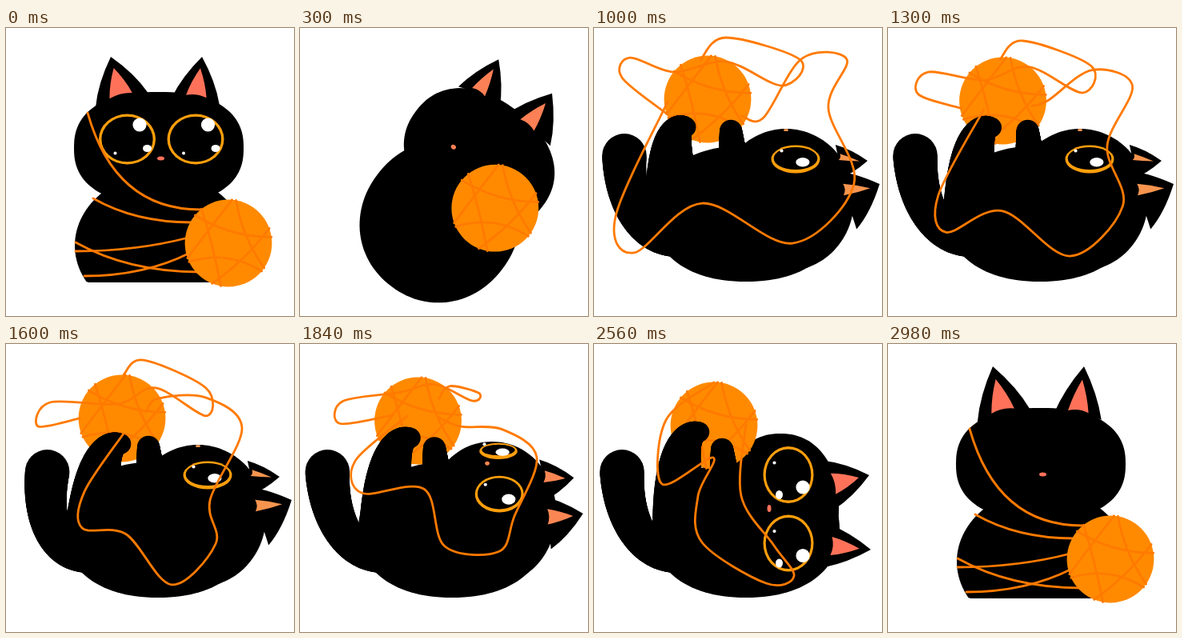
Recreate the animation shown at these times as an HTML page with a canvas. Size 360 by 360 pixels, loop 3 s.

```html
<!DOCTYPE html>
<html lang="en">
<head>
<meta charset="utf-8">
<title>Cat and yarn</title>
<style>
html, body { margin: 0; width: 100%; height: 100%; overflow: hidden; background: #fff; }
canvas { display: block; width: 360px; height: 360px; }
</style>
</head>
<body>
<canvas id="stage"></canvas>
<script>
const canvas = document.getElementById('stage');
const ctx = canvas.getContext('2d');
const dpr = window.devicePixelRatio || 1;
canvas.width = canvas.height = 360 * dpr;

const LOOP = 3000, PIVOT = [185, 197], R = 54.4;
const YARN = '#ff7a00', BALL = '#ff8a00', RING = '#ff9f0c';
const TURN = Math.PI / 2, TAU = Math.PI * 2;

const clamp = v => Math.max(0, Math.min(1, v));
const smooth = k => k * k * (3 - 2 * k);
const linear = k => k;
const ramp = (t, a, b) => smooth(clamp((t - a) / (b - a)));
const mix = (a, b, k) => Array.isArray(a) ? a.map((v, i) => mix(v, b[i], k)) : a + (b - a) * k;

// Value of a keyed track: [time, value], ...
function track(t, keys, ease = smooth) {
  const i = keys.findIndex(key => t <= key[0]);
  if (i < 0) return keys[keys.length - 1][1];
  if (i === 0) return keys[0][1];
  const [t0, a] = keys[i - 1], [t1, b] = keys[i];
  return mix(a, b, ease((t - t0) / (t1 - t0)));
}

// All poses are in the lying frame; the whole cat is turned to sit.
// head, body: x, y, rx, ry, power, left cut; ears: base, tip, half width;
// eyes: x, y, half width, half height; nose: x, y, rx, ry
const body = [190, 232, 117, 85, 2.2, 0];
const front = {
  head: [233, 206, 73, 94, 2.2, 0], body,
  ears: [[294, 176, 344, 164, 31], [291, 252, 346, 257, 27]],
  eyes: [[243, 163.5, 35.5, 31.5], [243, 249, 35.5, 31.5]],
  nose: [219, 205.5, 2.5, 4.5], side: 0, glint: 1
};
const turned = {
  head: [240, 206, 73, 90, 2.1, 0], body,
  ears: [[299, 175, 343, 169, 33], [297, 235, 349, 238, 26]],
  eyes: [[245, 152, 25.5, 29.5], [245, 223.5, 31, 30.5]],
  nose: [225, 182, 2.5, 4], side: 0, glint: 0
};
const profile = {
  head: [240, 215, 85, 89, 2, 0], body,
  ears: [[303, 168, 342, 166, 22], [312, 215, 357, 195, 40]],
  eyes: [[250, 122, 0, 20], [252, 164, 17.5, 30.5]],
  nose: [240, 127.5, 3, 1.5], side: 1, glint: 0
};
const sitting = lift => ({
  ...front,
  head: [232, 203, 70, 106, 2.4, 0],
  body: [110, 205, 90, 107, 2, 64],
  ears: [[292, 157, 346 + lift, 143, 34], [291, 249, 346 + lift, 257, 30]]
});

// Hind leg as base, bend, end; then the end of the other paw
const legKeys = [
  [1000, [100, 225, 88, 118, 116, 124, 171, 128]],
  [1600, [110, 230, 112, 120, 145, 125, 178, 128]],
  [2080, [110, 225, 100, 110, 134, 110, 158, 131]],
  [2560, [109, 225, 98, 110, 133, 110, 160, 131]]
];
const ballKeys = [
  [160, [278, 269]], [540, [168, 128]], [1000, [142, 89]], [1600, [145, 93]],
  [2080, [150, 99]], [2560, [150, 102]], [2840, [278, 269]]
];
const swayKeys = [[700, 12], [1000, 3], [1300, -1], [1600, 17], [1860, -1], [2080, 2], [2560, 0]];
const longYarn = [
  [1000, [185,110, 212,112, 260,38, 316,39, 293,100, 325,195, 248,269, 135,219, 50,281, 27,235, 92,92]],
  [1600, [175,85, 190,68, 250,67, 295,105, 255,195, 262,250, 207,301, 150,238, 95,230, 98,185, 147,112]],
  [2080, [170,98, 212,138, 255,146, 297,178, 281,235, 235,269, 155,205, 160,125, 60,143, 40,108, 122,68]],
  [2560, [190,100, 184,190, 225,252, 250,290, 215,299, 135,248, 130,190, 149,142, 85,175, 90,95, 150,48]]
];
const shortYarn = [
  [1000, [92,108, 35,62, 45,37, 100,55, 165,42, 235,72, 258,40, 165,12, 133,40]],
  [1600, [92,93, 40,103, 55,73, 140,75, 187,55, 250,90, 250,55, 172,20, 147,38]],
  [2080, [140,85, 60,96, 52,70, 110,46, 150,46, 180,52, 198,68, 203,85, 200,98]]
];
// Ends of the strands wound round the sitting cat
const wraps = [[102,106, 243,227], [109,213, 232,243], [87,268, 242,305], [87,279, 228,262], [98,310, 230,281]];

function oval(x, y, rx, ry, fill) {
  ctx.beginPath();
  ctx.ellipse(x, y, Math.max(0, rx), Math.max(0, ry), 0, 0, TAU);
  ctx.fillStyle = fill;
  ctx.fill();
}

function bulb([x, y, rx, ry, power, cut]) {
  const bend = v => Math.sign(v) * Math.abs(v) ** (2 / power);
  ctx.beginPath();
  for (let a = 0; a < TAU; a += TAU / 120) {
    ctx.lineTo(Math.max(cut, x + rx * bend(Math.cos(a))), y + ry * bend(Math.sin(a)));
  }
  ctx.fillStyle = '#000';
  ctx.fill();
}

// Round limb along a cubic, its radius running from r0 to r1
function limb([ax, ay], [bx, by], [cx, cy], [dx, dy], r0, r1) {
  for (let k = 0; k <= 1; k += 1 / 60) {
    const j = 1 - k, w = [j * j * j, 3 * j * j * k, 3 * j * k * k, k * k * k];
    const r = r0 + (r1 - r0) * k;
    oval(w[0] * ax + w[1] * bx + w[2] * cx + w[3] * dx,
      w[0] * ay + w[1] * by + w[2] * cy + w[3] * dy, r, r, '#000');
  }
}

function horn(bx, by, tx, ty, w, fill) {
  const dx = tx - bx, dy = ty - by, len = Math.hypot(dx, dy);
  const nx = -dy / len * w, ny = dx / len * w, mx = bx + dx / 2, my = by + dy / 2;
  ctx.beginPath();
  ctx.moveTo(bx - nx, by - ny);
  ctx.quadraticCurveTo(mx - nx * .7, my - ny * .7, tx, ty);
  ctx.quadraticCurveTo(mx + nx * .7, my + ny * .7, bx + nx, by + ny);
  ctx.quadraticCurveTo(bx + dx * .12, by + dy * .12, bx - nx, by - ny);
  ctx.fillStyle = fill;
  ctx.fill();
}
function ear([bx, by, tx, ty, w], side, pink) {
  horn(bx, by, tx, ty, w, '#000');
  const dx = tx - bx, dy = ty - by, slip = .3 * side * w / Math.hypot(dx, dy);
  horn(bx + dx * .1 + dy * slip, by + dy * .1 - dx * slip,
    bx + dx * .74, by + dy * .74, w * (.43 - .25 * side), pink);
}

function eye([x, y, a, b], open, glint) {
  if (a < 1 || open < .04) return;
  const s = a / 35.5;
  const dot = (u, v, ru, rv) => oval(-v, u, rv, ru, '#fff');
  ctx.save();
  ctx.translate(x, y);
  ctx.scale(open, 1);
  oval(0, 0, b, a, RING);
  oval(0, (s - 1) * 2, b - 3.2, a - 3.4, '#000');
  dot(15.5 * s * s, -18 * s, 3 + 5.6 * s, 8.6);
  dot(-6 - 9 * s, 17.5, 2, 2.1);
  dot(25, 11.5, 5.5 * glint, 4.5 * glint);
  ctx.restore();
}

function ball([x, y]) {
  oval(x, y, R, R, BALL);
  for (let i = 0; i < 6; i++) {
    const a = i * TAU / 6 + .7, b = a + 2 + .3 * (i % 2), c = (a + b) / 2, bow = R * (.15 + .2 * (i % 3));
    ctx.beginPath();
    ctx.moveTo(x + R * Math.cos(a), y + R * Math.sin(a));
    ctx.quadraticCurveTo(x + bow * Math.cos(c), y + bow * Math.sin(c), x + R * Math.cos(b), y + R * Math.sin(b));
    ctx.stroke();
  }
}

// Smooth strand through its key points, drawn out of the ball by k
function strand(t, keys, [hx, hy], k) {
  if (k <= 0) return;
  const p = track(t, keys, linear).map((v, i) => i % 2 ? mix(hy, v, k) : mix(hx, v, k));
  const n = p.length / 2;
  const at = i => { const j = 2 * Math.max(0, Math.min(n - 1, i)); return [p[j], p[j + 1]]; };
  ctx.beginPath();
  ctx.moveTo(p[0], p[1]);
  for (let i = 0; i < n - 1; i++) {
    const [a, b, c, d] = [at(i - 1), at(i), at(i + 1), at(i + 2)];
    ctx.bezierCurveTo(b[0] + (c[0] - a[0]) / 6, b[1] + (c[1] - a[1]) / 6,
      c[0] - (d[0] - b[0]) / 6, c[1] - (d[1] - b[1]) / 6, c[0], c[1]);
  }
  ctx.stroke();
}

function wrap([x0, y0, x1, y1]) {
  ctx.beginPath();
  ctx.moveTo(x0, y0);
  ctx.quadraticCurveTo((x0 + x1) / 2 - (y1 - y0) * .3, Math.max(y0, y1), x1, y1);
  ctx.stroke();
}

function rotated(angle, draw) {
  ctx.save();
  ctx.translate(...PIVOT);
  ctx.rotate(angle);
  ctx.translate(-PIVOT[0], -PIVOT[1]);
  draw();
  ctx.restore();
}

function catPose(t) {
  const sit = sitting(8 * ramp(t, 160, 240));
  const pose = {};
  for (const part in sit) {
    pose[part] = track(t, [[160, sit[part]], [480, profile[part]], [1660, profile[part]],
      [2080, turned[part]], [2500, front[part]], [2560, front[part]], [2840, sit[part]]]);
  }
  return pose;
}

function draw(t) {
  ctx.setTransform(dpr, 0, 0, dpr, 0, 0);
  ctx.fillStyle = '#fff';
  ctx.fillRect(0, 0, 360, 360);
  ctx.lineCap = ctx.lineJoin = 'round';
  ctx.strokeStyle = YARN;
  ctx.lineWidth = 2.8;

  const pose = catPose(t);
  const angle = (ramp(t, 160, 480) - ramp(t, 2560, 2840)) * TURN;
  const open = 1 - ramp(t, 160, 240) + ramp(t, 400, 520) - ramp(t, 2600, 2740);
  const limbs = ramp(t, 545, 780) - ramp(t, 2570, 2720);
  const wound = 1 - ramp(t, 160, 240) + ramp(t, 2780, 2840);
  const longOut = ramp(t, 560, 900) - ramp(t, 2570, 2760);
  const shortOut = ramp(t, 560, 900) - ramp(t, 2200, 2540);
  const pink = 'rgb(' + mix([255, 114, 89], [247, 149, 79], pose.side).map(Math.round) + ')';
  const hub = track(t, ballKeys);
  const reach = (x, y) => [mix(130, x, limbs), mix(235, y, limbs)];

  rotated(angle - TURN, () => {
    if (limbs > 0) {
      const sway = track(t, swayKeys);
      limb(reach(100, 268), reach(60, 262), reach(35 + sway * .5, 215), reach(35 + sway, 157), 18, 28);
    }
    bulb(pose.body);
    bulb(pose.head);
    pose.ears.forEach(e => ear(e, pose.side, pink));
    pose.eyes.forEach(e => eye(e, open, pose.glint));
    oval(...pose.nose, pink);
  });

  if (wound > 0) rotated(angle, () => {
    ctx.globalAlpha = wound;
    wraps.forEach(wrap);
  });

  ball(hub);

  if (limbs > 0) rotated(angle - TURN, () => {
    const [bx, by, cx, cy, ex, ey, px, py] = track(t, legKeys);
    const base = reach(bx, by), bend = reach(cx, cy), end = reach(ex, ey), paw = reach(px, py);
    limb(base, mix(base, bend, 2 / 3), mix(end, bend, 2 / 3), end, 36, 12);
    const hip = reach(px + 4, 178);
    limb(hip, mix(hip, paw, 1 / 3), mix(hip, paw, 2 / 3), paw, 20, 14);
  });

  strand(t, shortYarn, hub, shortOut);
  strand(t, longYarn, hub, longOut);
}

const start = performance.now();
function tick() {
  draw((performance.now() - start) % LOOP);
  requestAnimationFrame(tick);
}
tick();
</script>
</body>
</html>
```
